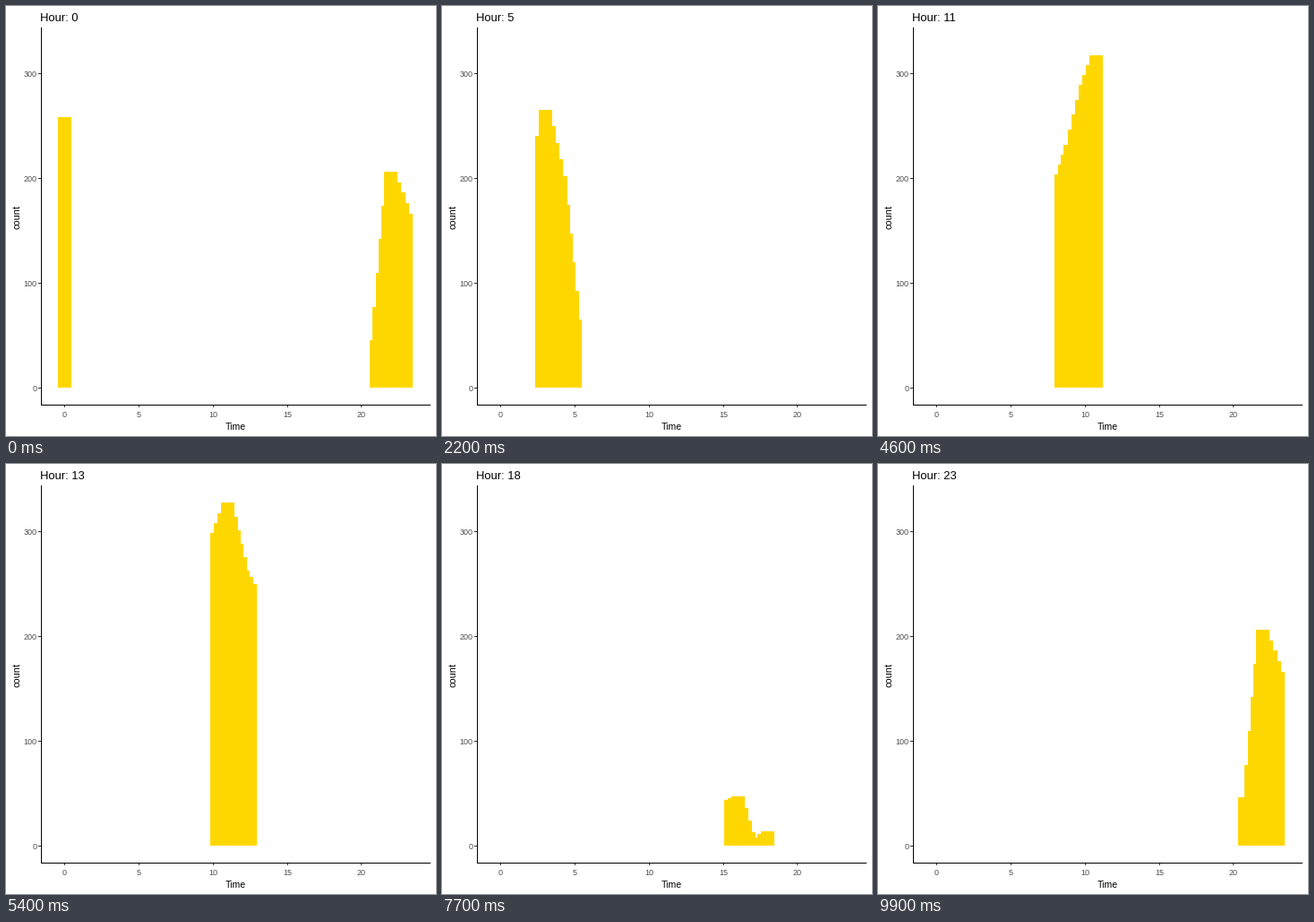
Animation, 480 px wide and 480 px high, one loop 10 s. Source, as a matplotlib script:

```python
import numpy as np
import matplotlib.pyplot as plt
from matplotlib.animation import FuncAnimation
from matplotlib.patches import Rectangle

SIZE, FRAMES, WAKE = 480, 100, 10
GOLD, GREY = "#FFD700", "#4D4D4D"
X0, Y0 = 65.9, 426          # pixel position of the data origin
XS, YS = 16.546, 1.17       # pixels per hour and per count
HALF = 0.45                 # half a bar, in hours

COUNTS = [258, 247, 165, 265, 202, 65, 223, 117, 185, 232, 289, 327,
          262, 238, 125, 40, 47, 1, 14, 32, 50, 45, 206, 166]
HOURS = np.arange(24)
KEYS = np.round((FRAMES - 1) * HOURS / 23)

plt.rcParams["font.family"] = "Liberation Sans"
fig = plt.figure(figsize=(SIZE / 72, SIZE / 72), dpi=72, facecolor="white")
ax = fig.add_axes([0, 0, 1, 1])
ax.set_xlim(0, SIZE)
ax.set_ylim(SIZE, 0)
ax.axis("off")


def box(x, y, w, h, color):
    return ax.add_patch(Rectangle((x, y), w, h, fc=color, lw=0, aa=False))


def label(x, y, text, size, color="black", ha="center", **kw):
    return ax.text(x, y, text, fontsize=size, color=color, ha=ha,
                   va="baseline", **kw)


bars = [box(0, 0, 0, 0, GOLD) for _ in range(WAKE + 1)]

box(39, 24, 1, 422, "black")
box(39, 445, 435, 1, "black")
for v in range(0, 301, 100):
    y = round(Y0 - YS * v)
    box(36, y, 3, 1, "#333333")
    label(34.3, y + 4, str(v), 9, GREY, "right")
for v in range(0, 21, 5):
    x = int(X0 + XS * v)
    box(x, 446, 1, 2, "#333333")
    label(x + 0.5, 459, str(v), 9, GREY)

label(256.3, 473, "Time", 10.5)
label(15, 235.5, "count", 11, rotation=90, rotation_mode="anchor")
title = label(38.3, 17, "", 13, ha="left")


def update(i):
    for back, bar in enumerate(bars):
        f = (i - back) % FRAMES
        hour = np.interp(f, KEYS, HOURS)
        count = np.interp(f, KEYS, COUNTS)
        left = round(X0 + XS * (hour - HALF))
        right = round(X0 + XS * (hour + HALF))
        top = round(Y0 - YS * count)
        bar.set_bounds(left, top, right - left, Y0 - top)
    title.set_text(f"Hour: {round(23 * i / (FRAMES - 1))}")
    return [*bars, title]


anim = FuncAnimation(fig, update, frames=FRAMES, interval=100,
                     repeat=True, repeat_delay=0)
plt.show()
```
